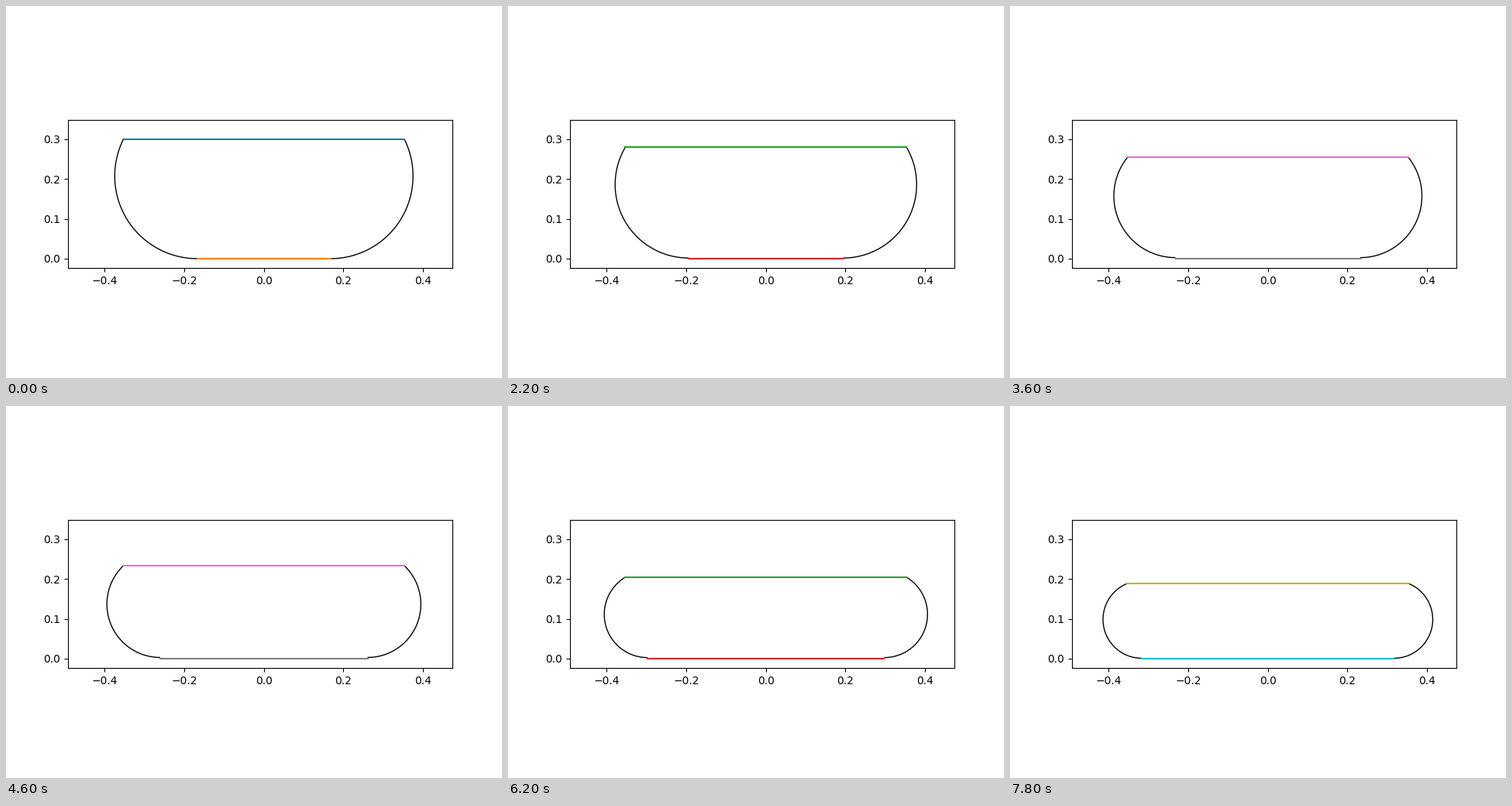
Write a matplotlib script that moves like this. It is 640 px wide and 480 px high and loops after 8000 ms.

```python
import numpy as np
import matplotlib.pyplot as plt
from matplotlib.animation import FuncAnimation

FRAMES = 40
DT = 0.01                   # simulated seconds per frame
HALF = 0.353                # half width of the loaded platform
SLACK = 3 * np.pi / 16 - HALF
PRESSURE, MASS, G = 2000, 100, 9.8


def bag_shape(height):
    """Side arc angle, radius and half width of the contact patch."""
    lo, hi = 1.0, np.pi
    for _ in range(50):
        phi = (lo + hi) / 2
        if SLACK * (1 - np.cos(phi)) / (phi - np.sin(phi)) > height:
            lo = phi
        else:
            hi = phi
    radius = SLACK / (phi - np.sin(phi))
    return phi, radius, HALF - radius * np.sin(phi)


def simulate():
    """Explicit Euler fall; the bag shape trails the platform by one step."""
    states = []
    height, speed = 0.3, 0.0
    for _ in range(FRAMES):
        phi, radius, foot = bag_shape(height)
        height += speed * DT
        speed += (PRESSURE * 2 * foot / MASS - G) * DT
        states.append((height, phi, radius, foot))
    return states


states = simulate()

fig, ax = plt.subplots(figsize=(6.4, 4.8), dpi=100)
ax.set_aspect("equal")
ax.set(xlim=(-0.4922, 0.4737), ylim=(-0.0232, 0.3488))

left, right = (ax.plot([], [], "k", lw=1, solid_capstyle="butt", zorder=1)[0]
               for _ in range(2))
top, bottom = (ax.plot([], [], lw=1.5)[0] for _ in range(2))


def draw(i):
    height, phi, center, foot = states[i]
    radius = np.hypot(HALF - foot, height - center)
    angle = np.linspace(0, phi, 150)
    x = foot + radius * np.sin(angle)
    y = center - radius * np.cos(angle)
    left.set_data(-x, y)
    right.set_data(x, y)
    top.set_data([-HALF, HALF], [height, height])
    bottom.set_data([-foot, foot], [0, 0])
    top.set_color(f"C{2 * i % 10}")
    bottom.set_color(f"C{(2 * i + 1) % 10}")
    return left, right, top, bottom


anim = FuncAnimation(fig, draw, frames=FRAMES, interval=200,
                     repeat=True, repeat_delay=0)
plt.show()
```
